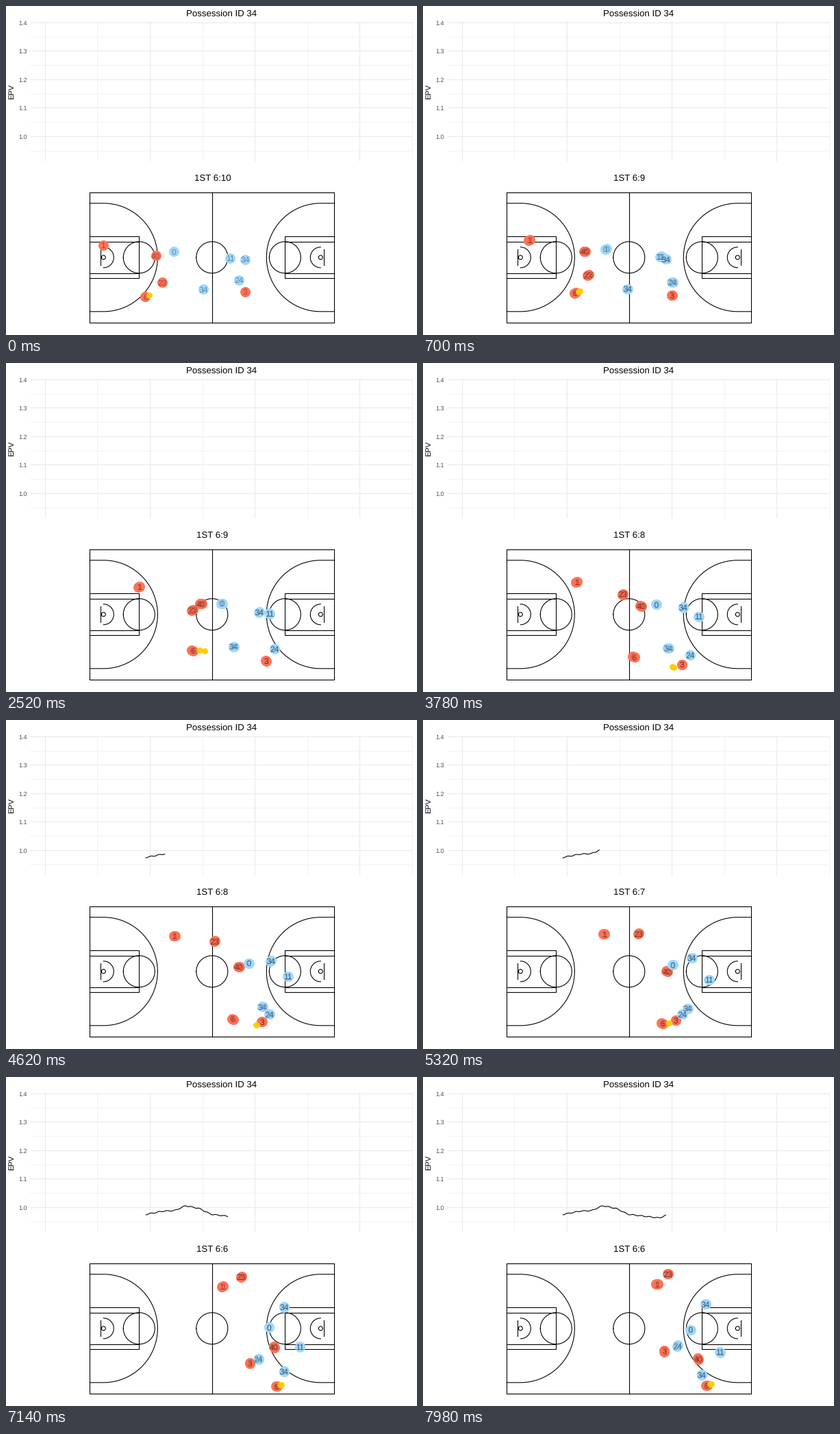
A matplotlib script that plays this animation: 600x480 px, repeating every 8000 ms.

```python
import numpy as np
import matplotlib.pyplot as plt
from matplotlib.animation import FuncAnimation

PT = 0.72            # points per pixel at 100 dpi
STEP_MS, TICK_MS, LOOP_MS = 140, 40, 8000
LAST = LOOP_MS // STEP_MS
GHOST = 0.28         # half the gap between the two samples shown per step
NUDGE = 0.7          # aligns drawn lines with whole pixels

plt.rcParams.update({"font.family": "Liberation Sans", "text.hinting": "none"})
fig = plt.figure(figsize=(6, 4.8), dpi=100, facecolor="white")
ax = fig.add_axes([0, 0, 1, 1])
ax.set(xlim=(NUDGE, 600 + NUDGE), ylim=(480 + NUDGE, NUDGE))
ax.axis("off")


def line(x, y, color="black", width=1.1, **kw):
    return ax.plot(x, y, color=color, lw=width * PT, **kw)[0]


def text(x, y, s, size, color="black", ha="center", va="baseline", **kw):
    return ax.text(x, y, s, size=size * PT, color=color, ha=ha, va=va, **kw)


# --- chart panel ---
def grid(x, y, width):
    line(x, y, "#ebebeb", width, zorder=0, solid_capstyle="butt")


for i in range(4):
    x = 57.5 + 153.1 * i
    grid([x, x], [23, 227], 1.2)
    grid([x + 76.6, x + 76.6], [23, 227], 0.6)
for i in range(5):
    y = 24.5 + 41.5 * i
    grid([35.5, 594], [y, y], 1.2)
    grid([35.5, 594], [y + 20.8, y + 20.8], 0.6)
    text(31.5, y + 3.8, f"{1.4 - 0.1 * i:.1f}", 9, "#4d4d4d", "right")
text(315.5, 15.5, "Possession ID 34", 13.2)
text(8.7, 125.5, "EPV", 11, rotation=90, va="center")
clock = text(302, 255.5, "", 13.2)

# EPV trend through its turning points, with a slight ripple
TURNS = np.array([(205, 201.2), (230, 196.4), (247, 195.6), (263, 188.4),
                  (283, 192.6), (300, 201), (346, 206.4), (355, 202.6)])
curve_x = np.linspace(205, 355, 60)
curve_y = np.interp(curve_x, *TURNS.T) + 0.7 * np.sin(curve_x / 1.9)
curve = line([], [])

# --- court ---
CX, CY = 301.5, 367.5


def arc(x, r, sweep=180, facing=1):
    a = np.radians(np.linspace(-sweep, sweep, 121))
    return x + facing * r * np.cos(a), CY + r * np.sin(a)


def half_court(side):
    """Draw one end; side is -1 for left, 1 for right."""
    end, foul, hoop, board = (CX + side * d for d in (178.5, 106.5, 158.5, 163))
    line(*arc(foul, 23))
    line(*arc(hoop, 3))
    line(*arc(hoop, 15, 90, -side))
    x, y = arc(hoop, 79, 90, -side)
    line([end, *x, end], [y[0], *y, y[-1]])
    line([end, foul, foul, end], CY + 30.5 * np.array([-1, -1, 1, 1]))
    for h in (-22.8, 22.8):
        line([end, foul], [CY + h, CY + h])
    line([board, board], [CY - 11.5, CY + 11.5])


line(CX + 178.5 * np.array([-1, 1, 1, -1, -1]),
     CY + 95 * np.array([-1, -1, 1, 1, -1]))
line([CX, CX], [CY - 95, CY + 95])
line(*arc(CX, 23))
half_court(-1)
half_court(1)

# --- players: each runs a cubic path through four evenly timed points ---
RED = [
    ("1", [(142.5, 349.5), (198, 326.5), (265, 313), (342, 303)]),
    ("40", [(219.5, 365), (289, 352), (357, 367.5), (402.5, 412)]),
    ("23", [(228.5, 404), (275, 358.5), (315.5, 312.5), (358, 288)]),
    ("6", [(204, 425), (277, 421), (350, 443), (414.5, 450.5)]),
    ("3", [(350, 417.5), (380.5, 436), (369.5, 438.5), (353, 400.5)]),
]
BLUE = [
    ("0", [(246, 359), (318.5, 351.5), (365, 358), (391, 369.5)]),
    ("11", [(328, 368.5), (387.5, 366.5), (418, 379.5), (434, 402)]),
    ("34", [(349.5, 370.5), (371.5, 363.5), (393, 347.5), (413, 332)]),
    ("24", [(340.5, 400.5), (393, 419), (379, 430), (372.5, 393)]),
    ("34", [(289, 414), (336, 414.5), (387, 421.5), (407.5, 435)]),
]


def cubic(points):
    coef = np.polyfit(np.linspace(0, LAST, 4), points, 3)
    return lambda s: s ** np.arange(3, -1, -1.0) @ coef


def dots(diameter, color, z):
    return ax.scatter([], [], s=(diameter * PT) ** 2, c=color,
                      linewidths=0, zorder=z)


class Team:
    def __init__(self, players, color, z):
        self.paths = [cubic(points) for _, points in players]
        self.dots = dots(15, color, z)
        self.labels = [[text(0, 0, name, 12, alpha=0.36, zorder=6)
                        for name, _ in players] for _ in range(2)]

    def move(self, times):
        spots = [[path(s) for path in self.paths] for s in times]
        self.dots.set_offsets(np.concatenate(spots))
        for row, labels in zip(spots, self.labels):
            for (x, y), label in zip(row, labels):
                label.set_position((x, y + 4.4))
        for label in self.labels[1]:
            label.set_visible(len(times) > 1)


red, blue = Team(RED, "#ff7256", 4), Team(BLUE, "#9fd8ff", 5)
ball = dots(8.8, "#ffcc00", 7)


def ball_at(s):
    """Number 6 dribbles, passes to number 3 and gets the ball back."""
    passed = np.interp(s, [17, 28, 36, 42], [0, 1, 1, 0])
    six, three = (path(s) for path in red.paths[3:])
    return (1 - passed) * (six + (6, -2)) + passed * (three + (-8, 5))


def draw(n):
    s = (n * TICK_MS + TICK_MS // 2) // STEP_MS
    times = [s - GHOST, s + GHOST] if s else [0.0]
    red.move(times)
    blue.move(times)
    ball.set_offsets([ball_at(t) for t in times])
    clock.set_text(f"1ST 6:{10 - (s + 10) // 15}")

    end = 354.8 + 5.1 * (s - LAST)
    x = np.append(curve_x[curve_x < end], end)
    shown = end > curve_x[0]
    curve.set_data(x if shown else [],
                   np.interp(x, curve_x, curve_y) if shown else [])
    return []


anim = FuncAnimation(fig, draw, frames=LOOP_MS // TICK_MS, interval=TICK_MS,
                     repeat=True, repeat_delay=0, blit=False)
plt.show()
```
